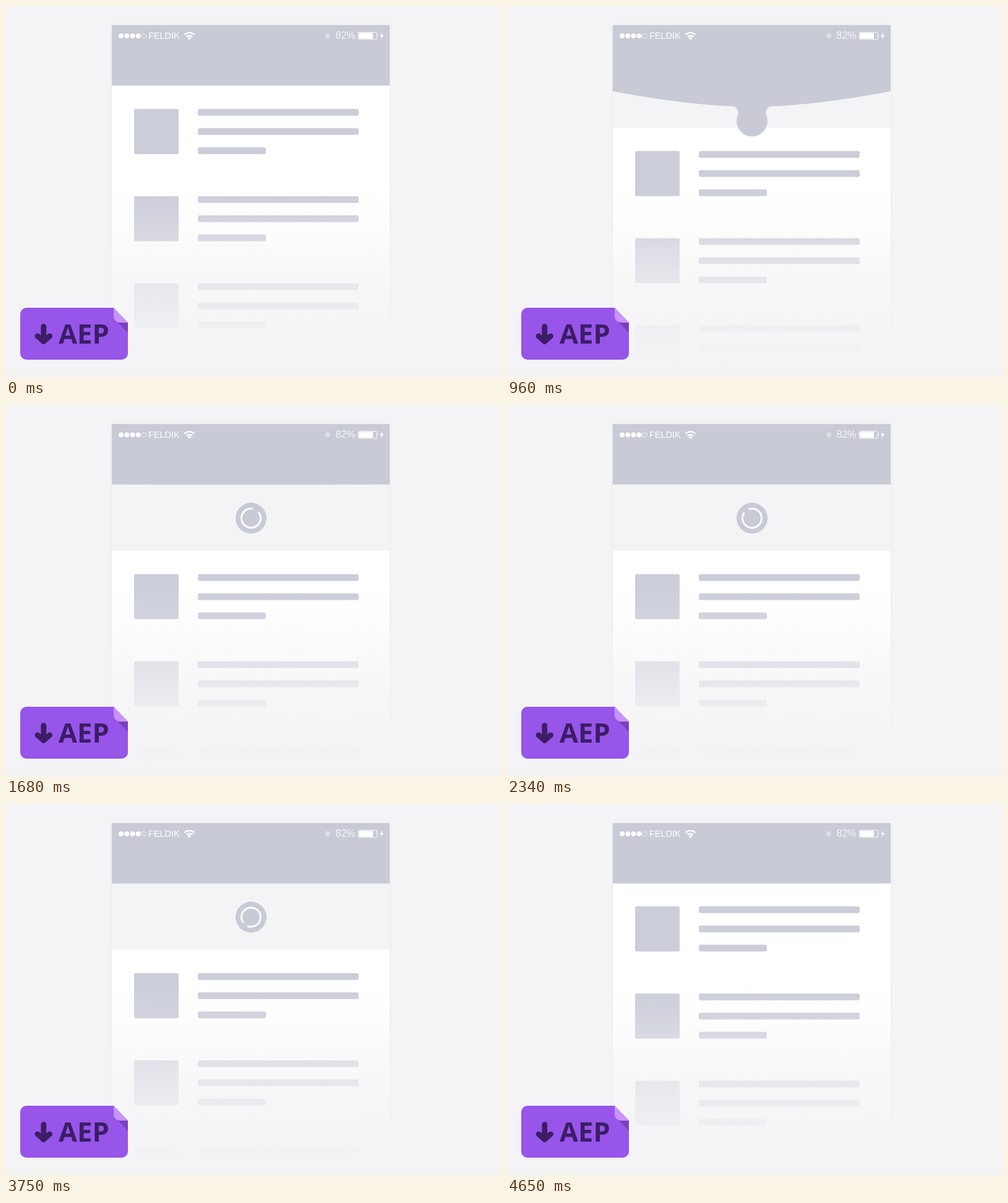
Write an HTML page that moves like this. It is 800 px wide and 600 px high and loops after 5.46 s.

```html
<!DOCTYPE html>
<html lang="en">
<head>
<meta charset="utf-8">
<title>Pull to refresh</title>
<style>
  html, body { margin: 0; width: 100%; height: 100%; overflow: hidden; background: #f4f4f6; }
  svg { display: block; width: 800px; height: 600px; }
  .status { font-family: "Liberation Sans", Arial, sans-serif; fill: #fff; }
  .badge { font: 700 43.5px "Open Sans", "Noto Sans", sans-serif; fill: #3c1d66; }
</style>
</head>
<body>
<svg viewBox="0 0 800 600">
  <defs>
    <linearGradient id="fade" gradientUnits="userSpaceOnUse" x1="0" y1="290" x2="0" y2="590">
      <stop offset="0" stop-color="#f4f4f6" stop-opacity="0"/>
      <stop offset=".18" stop-color="#f4f4f6" stop-opacity=".16"/>
      <stop offset=".3" stop-color="#f4f4f6" stop-opacity=".34"/>
      <stop offset=".43" stop-color="#f4f4f6" stop-opacity=".56"/>
      <stop offset=".55" stop-color="#f4f4f6" stop-opacity=".7"/>
      <stop offset=".75" stop-color="#f4f4f6" stop-opacity=".88"/>
      <stop offset=".9" stop-color="#f4f4f6" stop-opacity=".97"/>
      <stop offset="1" stop-color="#f4f4f6"/>
    </linearGradient>
    <filter id="soft" x="-5%" y="-5%" width="110%" height="110%"><feGaussianBlur stdDeviation="2"/></filter>
    <clipPath id="card"><rect x="171" y="31" width="449" height="557"/></clipPath>
    <g id="row" fill="#cbcdd9">
      <rect x="207" y="166.5" width="72" height="73" rx="2.5"/>
      <rect x="310" y="166.5" width="260" height="11" rx="3"/>
      <rect x="310" y="197.5" width="260" height="11" rx="3"/>
      <rect x="310" y="228.5" width="110" height="11" rx="3"/>
    </g>
  </defs>

  <rect width="800" height="600" fill="#f4f4f6"/>
  <rect x="171" y="31" width="449" height="554" opacity=".07" filter="url(#soft)"/>
  <rect x="171" y="31" width="449" height="557" fill="#f4f4f6"/>
  <g clip-path="url(#card)">
    <g id="list">
      <rect x="171" y="128.5" width="449" height="470" fill="#fff"/>
      <use href="#row"/>
      <use href="#row" y="141"/>
      <use href="#row" y="282"/>
    </g>
  </g>
  <rect x="160" y="290" width="471" height="300" fill="url(#fade)"/>
  <rect y="588" width="800" height="12" fill="#f3f3f4"/>

  <path id="goo" fill="#c8cad5"/>
  <path id="arc" fill="none" stroke="#fff" stroke-width="3" stroke-linecap="round"/>

  <g class="status">
    <circle cx="186" cy="48.3" r="4"/>
    <circle cx="195.2" cy="48.3" r="4"/>
    <circle cx="204.4" cy="48.3" r="4"/>
    <circle cx="213.6" cy="48.3" r="4"/>
    <circle cx="222.7" cy="48.3" r="3.7" fill="none" stroke="#fff" stroke-width=".7"/>
    <text x="230" y="53.4" font-size="14.5">FELDIK</text>
    <g fill="none" stroke="#fff" stroke-width="2.3">
      <path d="M288.4 46.4A11.5 11.5 0 0 1 304.6 46.4"/>
      <path d="M291.6 49.8A7 7 0 0 1 301.4 49.8"/>
    </g>
    <path d="M296.5 55L293.4 51.8A4.5 4.5 0 0 1 299.6 51.8Z"/>
    <circle cx="520" cy="48" r="4" opacity=".4"/>
    <text x="532.5" y="53.4" font-size="16" opacity=".85">82%</text>
    <rect x="569.5" y="42.5" width="30" height="11.5" rx="1.5" fill="none" stroke="#fff" stroke-width=".9"/>
    <rect x="570.5" y="43.5" width="22.5" height="9.5"/>
    <path d="M600.3 46q1.6 2.2 0 4.4z"/>
    <path d="M608.8 42.5L604 49H607L605.6 54L610.4 47.3H607.5Z"/>
  </g>

  <path d="M33 488H174L197 512V562a10 10 0 0 1-10 10H33a10 10 0 0 1-10-10V498a10 10 0 0 1 10-10Z" fill="#9755ea"/>
  <path d="M181 512H197V528.5Z" fill="#7a41bd"/>
  <path d="M174 488L197 512H184a10 10 0 0 1-10-10Z" fill="#c893fa"/>
  <path d="M60.8 518.3V541M51 533.8L60.8 542.6L70.6 533.8" fill="none" stroke="#3c1d66" stroke-width="8.8" stroke-linecap="round" stroke-linejoin="round"/>
  <text class="badge" x="85" y="546">AEP</text>
</svg>
<script>
  const LOOP = 5460, STEP = 30;
  const CX = 396, R = 25, LINE = 128.5;
  const OPEN = 750, CLOSE = 4170;
  const [list, goo, arc] = ["list", "goo", "arc"].map(id => document.getElementById(id));

  const clamp = (v, lo = 0, hi = 1) => Math.min(hi, Math.max(lo, v));
  const part = (t, from, to) => clamp((t - from) / (to - from));
  const out = (p, power) => 1 - (1 - p) ** power;
  const smooth = p => p * p * (3 - 2 * p);
  const mix = (a, b, p) => a + (b - a) * p;

  function listShift(t) {
    return t < CLOSE
      ? 107 * out(part(t, OPEN, 1320), 2.2)
      : mix(107, -1, out(part(t, CLOSE, 4650), 2.87));
  }

  function ballY(t) {
    if (t < 1140) return mix(100, 208, out(part(t, OPEN, 1140), 2.06));
    if (t < CLOSE) return mix(208, 183, smooth(part(t, 1140, 1650)));
    return mix(183, 103.7, out(part(t, CLOSE, 4650), 2.6));
  }

  // Pull on the header edge: stretch, then a damped wobble back to rest.
  function headerPull(t) {
    if (t < 1050) return out(part(t, OPEN, 1050), 2);
    const keys = [[1050, 1], [1395, -0.09], [1530, 0.05], [1650, 0.01], [1740, 0]];
    const i = keys.findIndex(k => t < k[0]);
    if (i < 0) return 0;
    const [a, b] = [keys[i - 1], keys[i]];
    return mix(a[1], b[1], smooth(part(t, a[0], b[0])));
  }

  // Header with the drop: fillets join the two until the neck closes.
  function gooPath(edge, mid, cy) {
    const gap = cy - mid;
    const r = clamp(25 - 0.6 * (gap + 1), 10, 25);
    const reach = (R + r) ** 2 - (r - gap) ** 2;
    const d = Math.sqrt(Math.max(0, reach));
    const hidden = gap + R <= 0;
    const joined = !hidden && !(gap > r && d < r);
    const bend = mix(edge, mid, 0.85);
    const half = hidden ? 0 : joined ? d : 10;
    let bump = "", drop = "";

    if (joined) {
      const k = R / (R + r), tx = d * k, ty = cy + (r - gap) * k;
      bump = `A${r} ${r} 0 0 0 ${CX + tx} ${ty}` +
        `A${R} ${R} 0 ${ty < cy ? 1 : 0} 1 ${CX - tx} ${ty}` +
        `A${r} ${r} 0 0 0 ${CX - d} ${mid}`;
    } else if (!hidden) {
      const tip = clamp(1 - (gap - 43.5) / 7);
      bump = `Q${CX} ${mid} ${CX} ${mid + 10 * tip}Q${CX} ${mid} ${CX - 10} ${mid}`;
      drop = `M${CX + 7} ${cy - 24}A${R} ${R} 0 1 1 ${CX - 7} ${cy - 24}` +
        `Q${CX} ${cy - 26} ${CX} ${cy - 25 - 8.5 * tip}Q${CX} ${cy - 26} ${CX + 7} ${cy - 24}Z`;
    }
    return `M171 31H620V${edge}Q510 ${bend} ${CX + half} ${mid}${bump}` +
      `Q281 ${bend} 171 ${edge}Z${drop}`;
  }

  function arcPath(t, cy) {
    const sweep = 318 * out(part(t, 1320, 1740), 2);
    const tail = 55 + 0.437 * (t - 1680);
    const at = deg => {
      const a = deg * Math.PI / 180;
      return `${CX + 15.5 * Math.sin(a)} ${cy - 15.5 * Math.cos(a)}`;
    };
    return `M${at(tail)}A15.5 15.5 0 ${sweep > 180 ? 1 : 0} 1 ${at(tail + sweep)}`;
  }

  function draw(now) {
    const t = Math.floor((now % LOOP) / STEP) * STEP;
    const cy = ballY(t), pull = headerPull(t);
    list.setAttribute("transform", `translate(0 ${listShift(t)})`);
    goo.setAttribute("d", gooPath(LINE + 10.5 * pull, LINE + 37 * pull, cy));
    arc.setAttribute("d", arcPath(t, cy));
    arc.setAttribute("opacity", t <= 1320 ? 0 : (1 - part(t, CLOSE, 4530)) ** 3);
  }

  const start = performance.now();
  function tick() {
    draw(performance.now() - start);
    requestAnimationFrame(tick);
  }
  tick();
</script>
</body>
</html>
```
